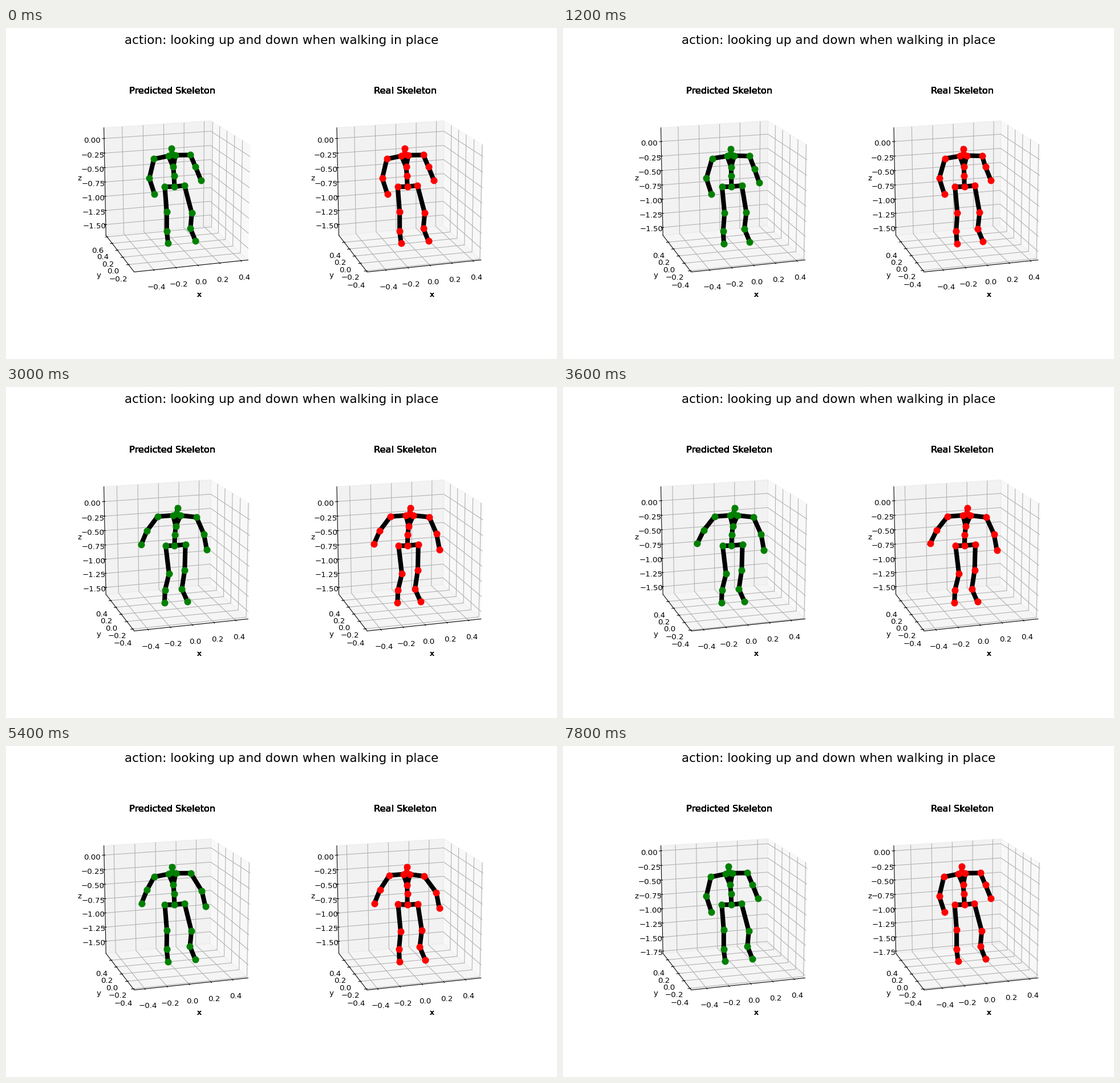
Recreate the animation shown at these times as a matplotlib script. Size 966 by 580 pixels, loop 8 s.

```python
import matplotlib.pyplot as plt
import numpy as np
from matplotlib.animation import FuncAnimation

W, H, DPI = 966, 580, 96.6
INTERVAL, HOLD, FRAMES = 200, 3, 40
MARGIN = 25 / 24                      # panes reach a little past the tick range
REACH = np.array([0.5, 0.5, 0.9])     # half range of x, y and z
TICK_STEP = (0.2, 0.2, 0.25)

# Each joint moves between a rest and a swing position (pixels from the
# pelvis, y down), driven by the named part of the body.
JOINTS = {
    "head": ("lean", (-5, -66.5), (5.5, -66)),
    "shoulder_l": ("lean", (-36, -48.5), (-29.5, -51)),
    "shoulder_r": ("lean", (28, -55.5), (38.5, -50)),
    "elbow_l": ("arm_l", (-44, -14.5), (-48.5, -27)),
    "hand_l": ("arm_l", (-35, 13), (-60, -3.5)),
    "elbow_r": ("arm_r", (37, -34.5), (52, -20)),
    "hand_r": ("arm_r", (46.5, -11), (57, 8)),
    "knee_l": ("lean", (-13.5, 44.5), (-9.5, 49.5)),
    "ankle_l": ("lean", (-13.5, 78.5), (-16.5, 78)),
    "foot_l": ("lean", (-11, 99.5), (-17.5, 100)),
    "knee_r": ("lean", (30.5, 46.5), (18, 43)),
    "ankle_r": ("lean", (28, 73), (13, 76)),
    "foot_r": ("lean", (37, 95.5), (23, 98.5)),
}

CHAINS = [
    ["root", "spine", "chest", "neck", "head"],
    ["chest", "collar_l", "shoulder_l", "elbow_l", "hand_l"],
    ["chest", "collar_r", "shoulder_r", "elbow_r", "hand_r"],
    ["root", "hip_l", "knee_l", "ankle_l", "foot_l"],
    ["root", "hip_r", "knee_r", "ankle_r", "foot_r"],
]

# Steps at which each part starts and ends its way out and its way back.
PRED_SWING = {"lean": (0, 5, 6, 9.5), "arm_l": (2.5, 5.5, 8.5, 11.2),
              "arm_r": (0.5, 5.5, 7.5, 12)}
REAL_SWING = {"lean": (0, 5.5, 6.5, 11), "arm_l": (2, 5.5, 8.5, 11.2),
              "arm_r": (2, 5.5, 8.5, 11.2)}


def ease(t):
    t = np.clip(t, 0, 1)
    return t * t * (3 - 2 * t)


def swing(s, a, b, c, d):
    return ease((s - a) / (b - a)) * (1 - ease((s - c) / (d - c)))


def wave(s, start, period):
    return np.cos(2 * np.pi * (s - start) / period)


def bump(s, mid, width):
    return np.exp(-((s - mid) / width) ** 2)


def height(s):
    return -0.767 + 0.085 * wave(s, 4.1, 18)


def pred_center(s):
    slow = wave(s, 0, 17)
    return -0.013 - 0.04 * slow, 0.088 + 0.018 * slow + 0.0213 * wave(s, 0, 3), height(s)


def real_center(s):
    return -0.01 - 0.042 * wave(s, 1.2, 13.5), 0.094 - 0.036 * bump(s, 4, 2), height(s)


def solid_text(x, y, text, **style):
    """Text with hard edges, built up by drawing it repeatedly."""
    for _ in range(8):
        fig.text(x / W, 1 - y / H, text, ha="center", **style)


class Panel:
    def __init__(self, slot, title, color, swings, center, twist):
        shift = 408.35 * (slot - 1)
        self.root = np.array([295.3 + shift, 278])
        self.swings, self.center, self.twist = swings, center, twist
        self.ax = fig.add_subplot(1, 2, slot, projection="3d")
        self.ax.set_box_aspect((1, 1, 1))
        self.ax.view_init(elev=16, azim=-107)
        self.ax.set_ylabel("y")
        self.ax.set_zlabel("z")
        solid_text(291.2 + shift, 114.7, title, fontsize=12, va="baseline")
        solid_text(338.4 + shift, 467.9, "x", fontsize=10, va="center")
        self.bones = [stage.plot([], [], color="black", lw=6)[0] for _ in CHAINS]
        self.dots, = stage.plot([], [], "o", color=color, ms=8, zorder=3)

    def pose(self, step):
        weight = {part: swing(step, *times) for part, times in self.swings.items()}
        p = {}
        for name, (part, rest, out) in JOINTS.items():
            p[name] = np.array(rest) + weight[part] * np.subtract(out, rest)
        turn = self.twist * bump(step, 8, 1)
        p["shoulder_l"] += turn * np.array([5, -5])
        p["shoulder_r"] += turn * np.array([-8, 9])
        head, left, right = p["head"], p["shoulder_l"], p["shoulder_r"]
        lift = np.array([0, -2.5])
        p["root"] = np.zeros(2)
        p["spine"] = head * (0.15, 0.285)
        p["chest"] = head * (0.43, 0.52)
        p["collar_l"] = left + 0.4 * (right - left) + lift
        p["collar_r"] = left + 0.59 * (right - left) + lift
        p["neck"] = (p["collar_l"] + p["collar_r"]) / 2 + (0, -3)
        sway = 0.15 * head[0]
        p["hip_l"] = np.array([-16.2 + sway, 0.2 - 2 * turn])
        p["hip_r"] = np.array([18.4 + sway, -2 + 3 * turn])
        return {k: self.root + v for k, v in p.items()}

    def follow(self, step):
        """Keep the 3D box centred on the walker."""
        ax = self.ax
        setters = [(ax.set_xlim, ax.set_xticks), (ax.set_ylim, ax.set_yticks),
                   (ax.set_zlim, ax.set_zticks)]
        for (set_lim, set_ticks), c, r, d in zip(setters, self.center(step), REACH, TICK_STEP):
            set_lim(c - r * MARGIN, c + r * MARGIN)
            set_ticks(d * np.arange(np.ceil((c - r) / d), np.floor((c + r) / d) + 1))

    def draw(self, step):
        self.follow(step)
        pose = self.pose(step)
        for line, chain in zip(self.bones, CHAINS):
            line.set_data(*np.transpose([pose[j] for j in chain]))
        self.dots.set_data(*np.transpose(list(pose.values())))


# A hair over the pixel size, so that rounding down gives 966 by 580.
fig = plt.figure(figsize=(10.00001, 6.00415), dpi=DPI, facecolor="white")
fig.suptitle("action: looking up and down when walking in place", fontsize=16)

stage = fig.add_axes([0, 0, 1, 1], zorder=5)
stage.set_axis_off()
stage.set(xlim=(0, W), ylim=(H, 0), autoscale_on=False)

panels = [
    Panel(1, "Predicted Skeleton", "green", PRED_SWING, pred_center, twist=0),
    Panel(2, "Real Skeleton", "red", REAL_SWING, real_center, twist=1),
]


def update(n):
    for panel in panels:
        panel.draw(n // HOLD)
    return []


anim = FuncAnimation(fig, update, frames=FRAMES, interval=INTERVAL,
                     repeat=True, repeat_delay=0, blit=False)
plt.show()
```
